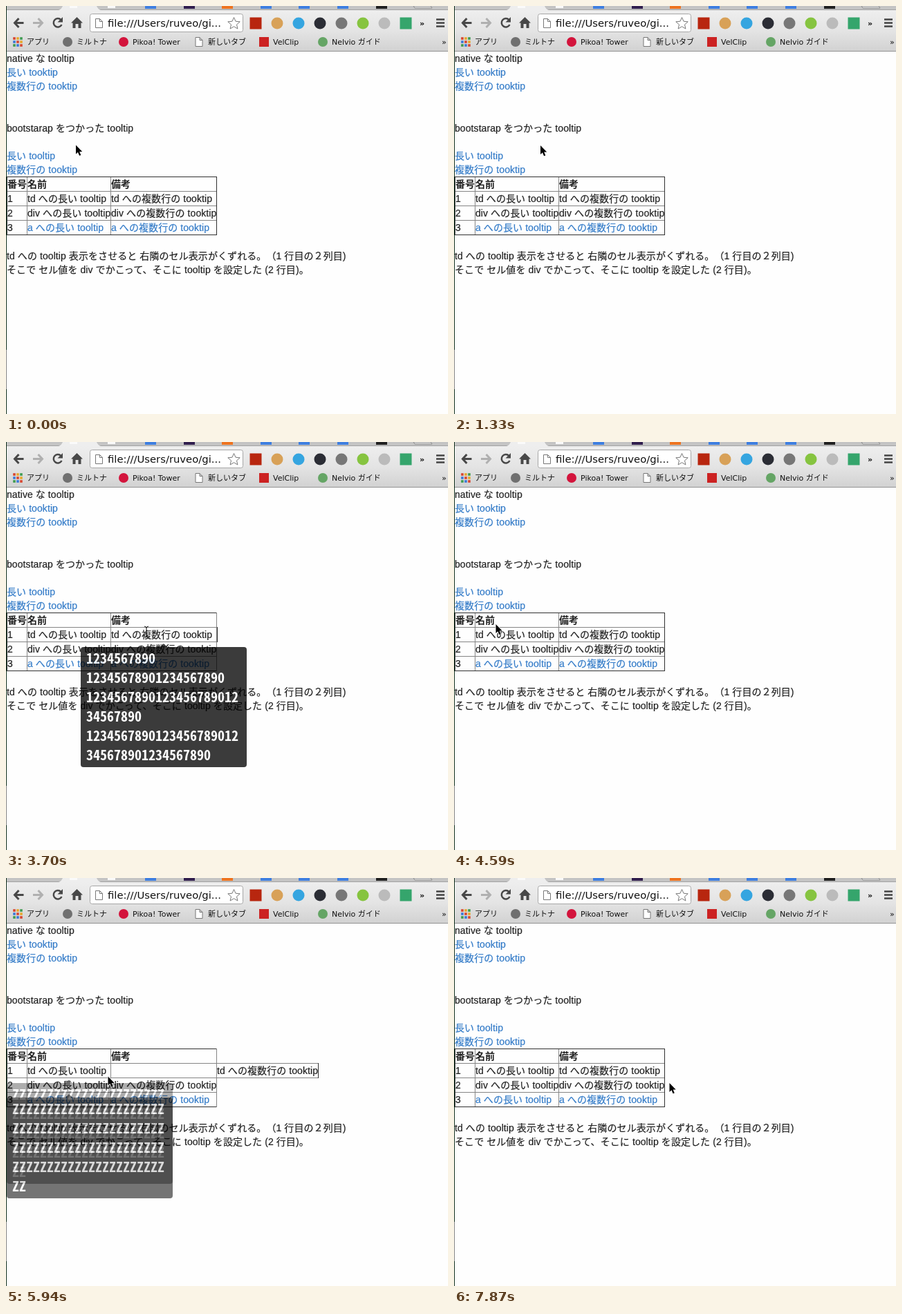
An HTML page for the animation above (8000 ms loop, 639 by 591 pixels).

```html
<!DOCTYPE html>
<html lang="ja">
<head>
<meta charset="utf-8">
<title>tooltip</title>
<style>
html, body { margin: 0; width: 100%; height: 100%; overflow: hidden; background: #fefefe; }
svg { display: block; }
text { white-space: pre; text-spacing-trim: space-all; font-feature-settings: "chws" 0; }
.page { font: 14px "Liberation Sans", "Noto Sans CJK JP", "Noto Sans CJK", sans-serif; letter-spacing: .08px; }
.page text { fill: currentColor; stroke: currentColor; stroke-width: .2px; color: #222; }
.page .link { color: #337bc8; }
.page .head { font-weight: bold; stroke: none; }
.bar { font: 11px "DejaVu Sans", "Noto Sans CJK JP", "Noto Sans CJK", sans-serif; fill: #111; }
.bar .url { font-size: 14.8px; }
.tip { font: bold 20px "Noto Sans Mono CJK JP", "Noto Sans CJK JP", monospace; fill: #fff; }
</style>
</head>
<body>
<svg id="stage" width="639" height="591" viewBox="0 0 639 591">
  <defs>
    <linearGradient id="metal" x1="0" y1="0" x2="0" y2="1">
      <stop offset="0" stop-color="#eee"/><stop offset=".5" stop-color="#e4e4e4"/>
      <stop offset="1" stop-color="#d2d2d2"/>
    </linearGradient>
  </defs>
  <rect width="639" height="591" fill="#fefefe"/>
  <g id="chrome" class="bar">
    <rect width="639" height="7" fill="#c4c4c4"/>
    <rect y="6" width="639" height="59" fill="url(#metal)"/>
    <rect y="5" width="639" height="1" fill="#a2a2a2"/>
    <path d="M76 6Q80 5 82 0H131Q133 5 137 6Z" fill="#eee"/>
    <path d="M589 0L591 3H616L614 0Z" fill="#d9d9d9" stroke="#8d8d8d"/>
    <rect y="65" width="639" height="1" fill="#929292"/>
    <path d="M25.500 24.500H13M18.500 18L12.500 24.500L18.500 31" fill="none" stroke="#484848" stroke-width="3"/>
    <path d="M39 24.500H52M46.500 18L52.500 24.500L46.500 31" fill="none" stroke="#b0b0b0" stroke-width="3"/>
    <path d="M79.500 20A6.200 6.200 0 1 0 80.500 27" fill="none" stroke="#484848" stroke-width="2.500"/>
    <path d="M82 16V23.500H74.500Z" fill="#484848"/>
    <path d="M102.500 16L111 24.500H108.500V32H104.500V26H100.500V32H96.500V24.500H94Z" fill="#484848"/>
    <rect x="121.500" y="11.500" width="221" height="26" rx="3" fill="#fff" stroke="#a6a6a6"/>
    <path d="M329.500 16.500L332 22.200L338.200 22.800L333.500 26.900L334.900 33L329.500 29.700L324.100 33L325.500 26.900L320.800 22.800L327 22.200Z" fill="#fff" stroke="#777"/>
    <path d="M622 19.500H634M622 24.500H634M622 29.500H634" stroke="#444" stroke-width="2.500"/>
  </g>
  <g id="page" class="page"></g>
  <g id="tips" class="tip"></g>
  <path id="arrow" d="M0 0V13L2.900 10.300L5.100 15.300L7.300 14.400L5.200 9.500H9.200Z" fill="#000" stroke="#fff" stroke-width="1.600" paint-order="stroke"/>
  <path id="beam" d="M-3 -8Q0 -8 0 -5Q0 -8 3 -8M0 -5V5M-3 8Q0 8 0 5Q0 8 3 8M-1.500 2.500H1.500" fill="none" stroke="#222"/>
</svg>
<script>
const $ = id => document.getElementById(id);

function add(parent, tag, attrs, content) {
  const node = document.createElementNS("http://www.w3.org/2000/svg", tag);
  for (const key in attrs) node.setAttribute(key, attrs[key]);
  if (content) node.textContent = content;
  parent.appendChild(node);
  return node;
}
const rect = (g, x, y, width, height, fill, rx = 0) => add(g, "rect", { x, y, width, height, fill, rx });
const dot = (g, cx, cy, r, fill) => add(g, "circle", { cx, cy, r, fill });
const square = (g, cx, cy, r, fill) => rect(g, cx - r, cy - r, 2 * r, 2 * r, fill);
const label = (g, x, y, str, cls = "") => add(g, "text", { x, y, class: cls }, str);

// Browser bars
const bar = $("chrome");
function sheet(g, cx, cy) {
  add(g, "path", { d: `M${cx - 5} ${cy - 6.5}h6l4 4v9h-10zm6 0v4h4`, fill: "#fff", stroke: "#777" });
}
function appGrid(g, cx, cy) {
  const colors = ["#d8452f", "#e8a72a", "#3e9b4f", "#3b78d8"];
  for (let i = 0; i < 9; i++) square(g, cx + (i % 3 - 1) * 5, cy + (Math.floor(i / 3) - 1) * 5, 1.8, colors[i % 4]);
}
sheet(bar, 134.5, 25);
label(bar, 147, 30, "file:///Users/ruveo/gi...", "url");
label(bar, 598, 29, "»").setAttribute("font-weight", "bold");
label(bar, 630, 56, "»");

const bookmarks = [
  [30, "アプリ", appGrid], [102, "ミルトナ", dot, "#707070"], [183, "Pikoa! Tower", dot, "#d3143c"],
  [292, "新しいタブ", sheet], [386, "VelClip", square, "#cc2222"], [471, "Nelvio ガイド", dot, "#65a565"]
];
for (const [x, name, icon, color] of bookmarks) {
  icon(bar, x - 13, 52, 7, color);
  label(bar, x, 56, name);
}

const extensions = ["#b8260f", "#d8a158", "#35a5e0", "#2b2d35", "#777", "#86c440", "#bbb", "#35a56c"];
extensions.forEach((color, i) => (i % 7 ? dot : square)(bar, 361 + 31 * i, 25, 8.5, color));

const favicons = ["#3f7fe0", "#32204f", "#ee7420", "#3f7fe0", "#3f7fe0", "#3f7fe0", "#222"];
favicons.forEach((color, i) => rect(bar, 201 + Math.round(55.6 * i), 0, 16, 4, color));
for (const x of [92, 147]) rect(bar, x, 0, 11, 3, "#fafafa");

// Page text
const page = $("page");
rect(page, 0, 0, 1, 591, "#12301d");
rect(page, 0, 498, 1, 57, "#858585");

const intro = ["native な tooltip", "長い tooktip", "複数行の tooktip", "", "",
  "bootstarap をつかった tooltip", "", "長い tooltip", "複数行の tooktip"];
intro.forEach((str, i) => label(page, 1, Math.round(81 + 20.1 * i), str, /^[長複]/.test(str) ? "link" : ""));
label(page, 1, 367, "td への tooltip 表示をさせると 右隣のセル表示がくずれる。（1 行目の２列目)");
label(page, 1, 387, "そこで セル値を div でかこって、そこに tooltip を設定した (2 行目)。");

// Table
const DARK = "#303030", GRAY = "#858585";
const TOP = 247, ROW = 21, RIGHT = 304, columns = [1, 30, 151];
for (let r = 1; r < 4; r++) rect(page, 1, TOP + r * ROW, RIGHT, 1, GRAY);
for (const x of columns) rect(page, x, TOP, 1, 4 * ROW + 1, x > 1 ? GRAY : DARK);
for (const y of [TOP, TOP + 4 * ROW]) rect(page, 1, y, RIGHT, 1, DARK);
const rightLine = rect(page, RIGHT, TOP, 1, 4 * ROW + 1, DARK);

// Extra cell that an open cell tooltip adds to its row
function extraCell(width) {
  const g = add(page, "g", {});
  for (const r of [1, 2]) rect(g, RIGHT + 1, TOP + r * ROW, width, 1, GRAY);
  rect(g, RIGHT + width, TOP + ROW, 1, ROW + 1, DARK);
  return g;
}
const wide = extraCell(147), sliver = extraCell(1);

const cell = (r, c, str, cls) => label(page, columns[c] + 1, TOP + 16 + r * ROW, str, cls);
["番号", "名前", "備考"].forEach((str, c) => cell(0, c, str, "head"));
const notes = ["td", "div", "a"].map((tag, i) => {
  const cls = tag === "a" ? "link" : "";
  cell(i + 1, 0, String(i + 1));
  cell(i + 1, 1, `${tag} への長い tooltip`, cls);
  return cell(i + 1, 2, `${tag} への複数行の tooktip`, cls);
});

// Tooltips: each visit is [enter, leave] in steps
const longText = [...Array(4).fill("Z".repeat(22)), "ZZ"];
const digits = (n, skip = 0) => "1234567890".repeat(3).slice(skip, skip + n);
const multiText = [digits(10), digits(20), digits(22), digits(8, 2), digits(22), digits(18, 2)];
const FADE = 2, FULL = 0.9;

function makeTip(center, y, text, ...visits) {
  const g = add($("tips"), "g", {});
  const x = Math.max(1, center - 120);
  add(g, "path", { d: `M${center - 5} ${y}l5 -5l5 5z`, fill: "#000" });
  rect(g, x, y, 240, text.length * 28 + 6, "#000", 4);
  text.forEach((str, i) => label(g, x + 8, y + 24 + i * 28, str));
  return { g, visits };
}
const linkTip = makeTip(52, 253, multiText, [1, 7]);
const cellTip = makeTip(91, 297, longText, [12, 18], [31, 33], [39.3, 40.2]);
const noteTip = makeTip(228, 297, multiText, [23.3, 29]);
const divTip = makeTip(91, 318, longText, [33, 39.2]);
const divNoteTip = makeTip(228, 318, multiText, [41, 43]);
const tips = [linkTip, cellTip, noteTip, divTip, divNoteTip];

const level = (tip, s) => FULL * Math.max(0, ...tip.visits.map(
  ([enter, leave]) => Math.min(1, (s - enter) / FADE, 1 - (s - leave) / FADE)));

// Pointer stops: arrive, depart, x, y
const stops = [
  [0, 0, 101, 201.5], [3, 6, 80, 234], [9, 9, 125, 202], [13, 17, 97, 279],
  [19, 19, 114.5, 259.5], [21, 21, 170, 240], [25, 28, 203, 275], [31, 31, 60.5, 264],
  [35, 38, 51, 299], [40, 40, 147.5, 287.5], [43, 46, 203, 298], [48, 49, 206, 303],
  [52, 52, 330, 297], [53, 53, 311.5, 297]
];
const ease = p => p * p * (3 - 2 * p);

function pointer(s) {
  const i = stops.findLastIndex(stop => stop[0] <= s);
  const [, depart, x, y] = stops[i];
  if (s <= depart) return [x, y];
  const [arrive, , nx, ny] = stops[i + 1];
  const p = ease((s - depart) / (arrive - depart));
  return [x + (nx - x) * p, y + (ny - y) * p];
}
const overText = (x, y) => y > 270 && y < 309 && x > 31 && x < 298 && Math.abs(x - 148.5) > 3;

const show = (node, on) => { node.style.display = on ? "" : "none"; };

const LOOP = 8000, STEP = 148.5, LEAD = 14;
let last = -1;

function draw(s) {
  for (const tip of tips) tip.g.setAttribute("opacity", level(tip, s));

  const shifted = level(cellTip, s) > 0, extra = level(noteTip, s) > 0;
  show(wide, shifted);
  show(sliver, extra);
  notes[0].setAttribute("x", shifted ? RIGHT + 1 : columns[2] + 1);
  rightLine.setAttribute("fill", shifted || extra ? GRAY : DARK);

  const [x, y] = pointer(s);
  for (const id of ["arrow", "beam"]) {
    $(id).setAttribute("transform", `translate(${x} ${y})`);
    show($(id), (id === "beam") === overText(x, y));
  }
}

function tick() {
  const s = Math.min(53, Math.floor((performance.now() % LOOP + LEAD) / STEP));
  if (s !== last) draw(last = s);
  requestAnimationFrame(tick);
}
tick();
</script>
</body>
</html>
```
